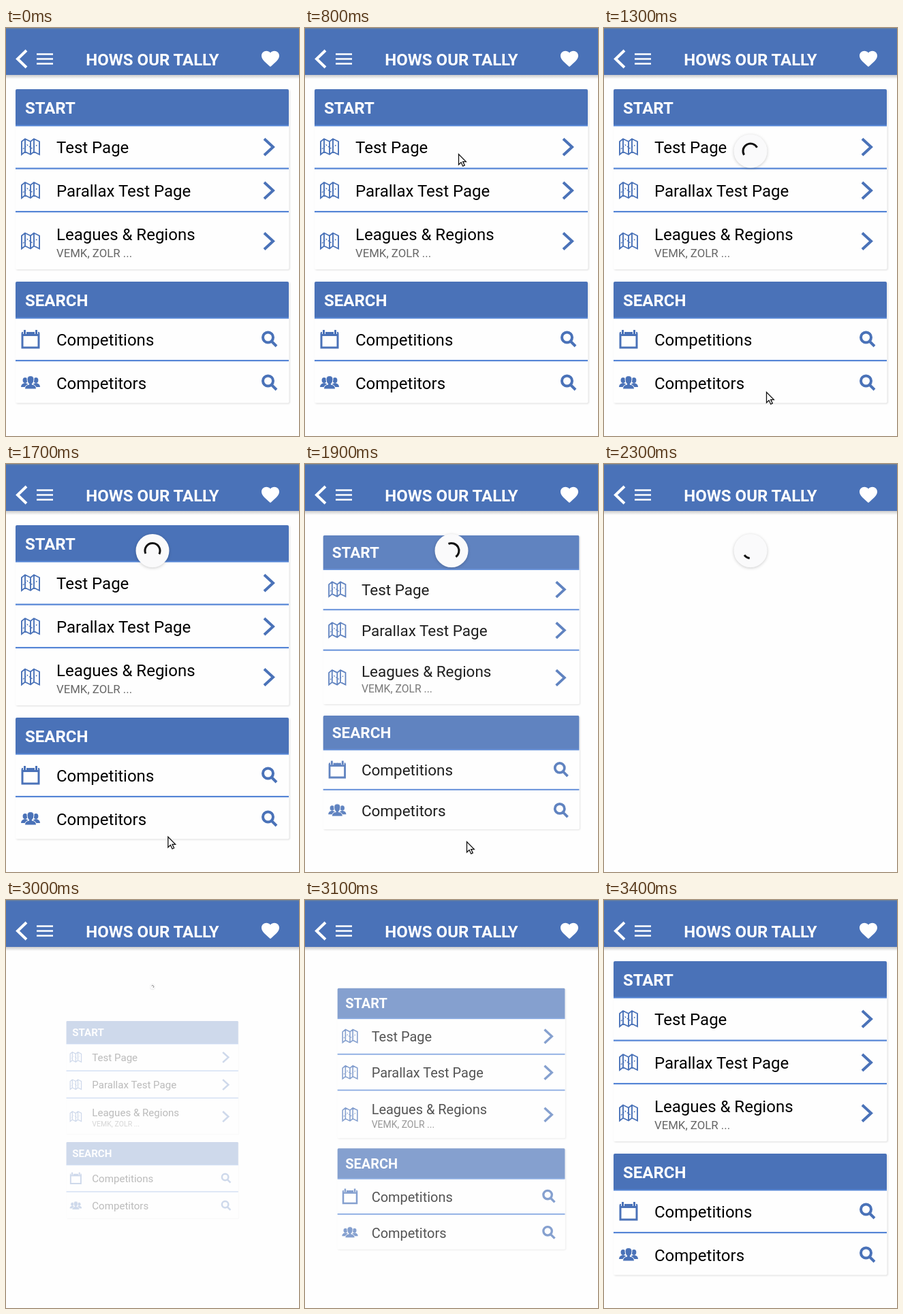
An HTML page for the animation above (3700 ms loop, 430 by 600 pixels).

```html
<!DOCTYPE html>
<html lang="en">
<head>
<meta charset="utf-8">
<title>Pull to refresh</title>
<style>
  html, body { margin: 0; width: 100%; height: 100%; overflow: hidden; background: #fefefe; }
  svg { display: block; font: 24px Roboto, Arial, sans-serif; }
  .bold { font-weight: 700; fill: #fff; }
  .sub { font-size: 16.8px; fill: #666; }
  .line { fill: none; stroke: #4a72b8; }
  .card { fill: #fefefe; filter: drop-shadow(1px 1px 1px #0002); }
  .disc { fill: #fafafb; filter: drop-shadow(0 1px 2px #0003); }
</style>
</head>
<body>
<svg width="430" height="600" viewBox="0 0 430 600">
  <defs>
    <linearGradient id="shade" x2="0" y2="1">
      <stop stop-color="#000" stop-opacity=".2"/>
      <stop offset="1" stop-color="#000" stop-opacity="0"/>
    </linearGradient>
    <g id="map" class="line" stroke-width="1.9">
      <path d="M-13-8l5-4 8 4 5-4 8 4v19l-8-4-5 4-8-4-5 4zM-8-12v19M0-8v19M5-12v19"/>
      <path d="M-11 3l6-6 7 5 8-5" stroke-dasharray="2 2" stroke-width="1.4"/>
    </g>
    <g id="calendar">
      <path class="line" d="M-12-8h24v20h-24z" stroke-width="3"/>
      <path d="M-13-11h26v6h-26z" fill="#4a72b8"/>
      <path d="M-8.5-14v6M-3-14v3M3-14v3M8.5-14v6" stroke="#fefefe" stroke-width="5"/>
      <path d="M-8.5-14v6M8.5-14v6" stroke="#4a72b8" stroke-width="3"/>
    </g>
    <g id="people" fill="#4a72b8">
      <ellipse cx="-8" cy="-4" rx="3.4" ry="4"/><ellipse cx="8" cy="-4" rx="3.4" ry="4"/>
      <path d="M-14 6q0-5 6-6 6 1 6 6zM2 6q0-5 6-6 6 1 6 6z"/>
      <path d="M-8.5 9q0-6 6.5-7-3-3-3-7 0-5.500 5-5.500t5 5.500q0 4-3 7 6.500 1 6.500 7z" stroke="#fefefe"/>
    </g>
    <path id="next" class="line" d="M-7-12L6 0-7 12" stroke-width="4"/>
    <path id="search" class="line" d="M4 3L11 10M6-3a7.500 7.500 0 1 1-15 0 7.500 7.500 0 1 1 15 0z" stroke-width="4"/>
  </defs>

  <g id="page"></g>

  <g id="spinner">
    <circle class="disc" r="24.5"/>
    <path id="arc" fill="none" stroke="#111" stroke-width="3"/>
  </g>

  <rect y="69" width="430" height="6" fill="url(#shade)"/>
  <rect width="430" height="69" fill="#4a72b8"/>
  <rect width="430" height="1.5" fill="#667f9f"/>
  <path d="M30 33L17 45.5 30 58" fill="none" stroke="#fff" stroke-width="4"/>
  <path d="M45 38.5h24M45 45.5h24M45 52.5h24" stroke="#fff" stroke-width="2.7"/>
  <text class="bold" x="215" y="55" text-anchor="middle">HOWS OUR TALLY</text>
  <path transform="translate(372.4 30) scale(1.3 1.27)" fill="#fff" d="M12 21.35l-1.45-1.32C5.4 15.36 2 12.28 2 8.5 2 5.42 4.42 3 7.5 3c1.74 0 3.41.81 4.5 2.09C13.09 3.81 14.76 3 16.5 3 19.58 3 22 5.42 22 8.5c0 3.78-3.4 6.86-8.55 11.54z"/>

  <path id="cursor" d="M.5.5v15.500l3.600-3.400 2.600 5.600 2.600-1.200-2.600-5.400h4.600z" fill="#fff" stroke="#111" stroke-width="1.3"/>
</svg>
<script>
const $ = id => document.getElementById(id);

const card = (title, top, bottom) => `
  <rect class="card" x="14" y="${top}" width="401.5" height="${bottom - top}" rx="2"/>
  <rect x="14" y="${top}" width="401" height="54" rx="2" fill="#4a72b8"/>
  <rect x="14" y="${top + 52.5}" width="401" height="2" fill="#5585d6"/>
  <text class="bold" x="28" y="${top + 35.5}">${title}</text>`;
const rule = y => `<rect x="14" y="${y}" width="401" height="2.2" fill="#5585d6"/>`;
const row = (label, y, icon, action, textY = y + 9) => `
  <use href="#${icon}" x="36" y="${y}"/>
  <text x="74" y="${textY}">${label}</text>
  <use href="#${action}" x="386" y="${y}"/>`;

$('page').innerHTML =
  card('START', 90, 355) +
  row('Test Page', 175, 'map', 'next') + rule(205.5) +
  row('Parallax Test Page', 239, 'map', 'next') + rule(269) +
  row('Leagues &amp; Regions', 313.5, 'map', 'next', 312) +
  '<text class="sub" x="74" y="336.5">VEMK, ZOLR ...</text>' +
  card('SEARCH', 373, 551.5) +
  row('Competitions', 458, 'calendar', 'search') + rule(488) +
  row('Competitors', 522, 'people', 'search');

const clamp = x => Math.min(1, Math.max(0, x));

// Linear interpolation through [time, value] pairs.
function track(t, keys) {
  let value = keys[0][1];
  for (let i = 1; i < keys.length; i++) {
    const [a, from] = keys[i - 1], [b, to] = keys[i];
    if (t >= a) value = from + (to - from) * clamp((t - a) / (b - a));
  }
  return value;
}

// cubic-bezier(.25, .1, .25, 1)
function ease(x) {
  if (x <= 0 || x >= 1) return clamp(x);
  const curve = (s, a, b) => 3 * (1 - s) ** 2 * s * a + 3 * (1 - s) * s * s * b + s ** 3;
  let lo = 0, hi = 1;
  for (let i = 0; i < 24; i++) {
    const mid = (lo + hi) / 2;
    if (curve(mid, .25, .25) < x) lo = mid; else hi = mid;
  }
  return curve(lo, .1, 1);
}

const cursorX = [[0, 330], [600, 236], [800, 225], [900, 226], [1200, 236], [1300, 238], [1900, 237], [2200, 235]];
const cursorY = [[0, 640], [600, 215], [800, 185], [900, 205], [1200, 491], [1300, 535], [1800, 551], [1900, 555], [2200, 620]];
const spinnerY = [[900, 44], [1200, 165], [1300, 181], [1450, 184], [1650, 127.5]];
const arcHead = [[900, 150], [1300, 331], [1900, 415], [2430, 534], [2900, 780]];
const arcSpan = [[900, 1], [1300, 182], [1520, 284], [2430, 9], [2900, 200]];

function draw(t) {
  const shown = t < 2600 ? 1 - ease((t - 1850) / 420) : ease((t - 2910) / 490);
  const page = $('page');
  page.setAttribute('opacity', shown);
  page.setAttribute('transform', `translate(215 327) scale(${.5 + shown / 2}) translate(-215 -327)`);

  const size = t < 900 ? 0 : 1 - clamp((t - 2875) / 150);
  const y = track(t, spinnerY);
  $('spinner').setAttribute('transform', `translate(215 ${y}) scale(${size})`);
  const span = track(t, arcSpan), head = track(t, arcHead);
  const point = deg => [11 * Math.cos(deg * Math.PI / 180), 11 * Math.sin(deg * Math.PI / 180)];
  $('arc').setAttribute('d', `M${point(head - span)}A11 11 0 ${+(span > 180)} 1 ${point(head)}`);
  $('arc').setAttribute('opacity', t < 1300 && y < 127 ? .3 : 1);

  $('cursor').setAttribute('transform', `translate(${track(t, cursorX)} ${track(t, cursorY)})`);
}

// Ten pictures a second, resting on the last one.
function tick() {
  const t = performance.now() % 3700;
  draw(Math.min(3400, Math.floor(t / 100) * 100));
  requestAnimationFrame(tick);
}
tick();
</script>
</body>
</html>
```
